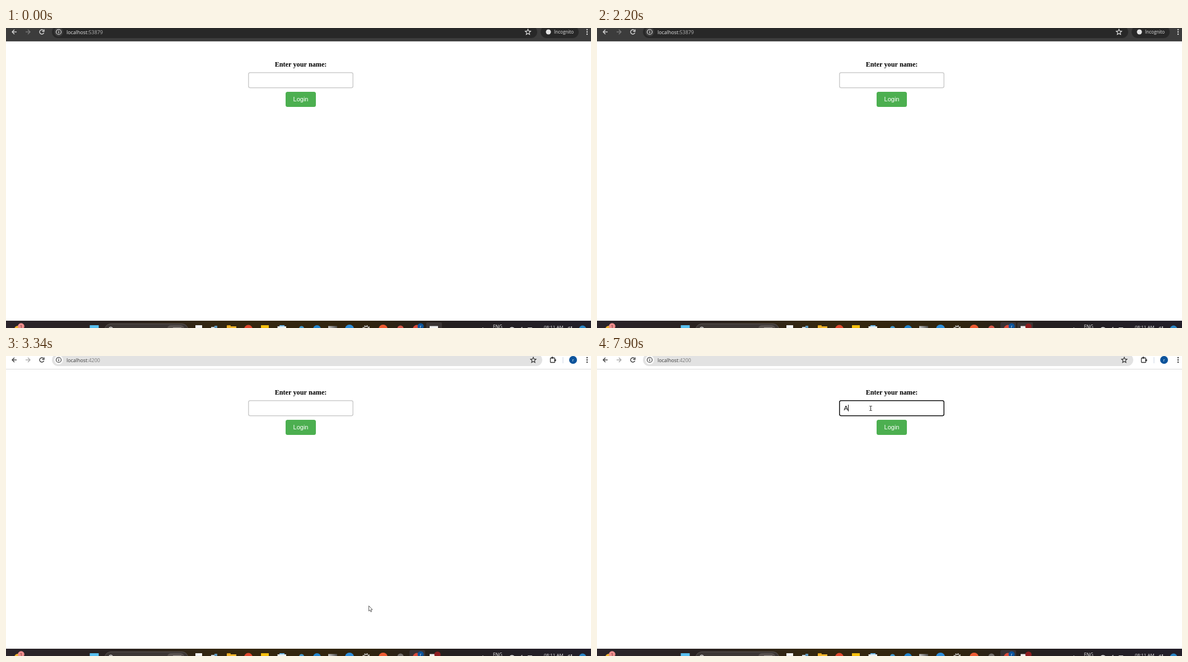
Animation, 1044 px wide and 536 px high, one loop 8000 ms. Source, as an HTML page with a canvas:

```html
<!DOCTYPE html>
<html lang="en">
<head>
<meta charset="utf-8">
<title>Login screen</title>
<style>
html, body { margin: 0; width: 100%; height: 100%; overflow: hidden; background: #fff; }
canvas { display: block; width: 1044px; height: 536px; }
</style>
</head>
<body>
<canvas id="stage" width="1044" height="536"></canvas>
<script>
const ctx = document.getElementById('stage').getContext('2d');
const LOOP = 8000;
const UI = '"Open Sans", "Noto Sans", sans-serif';
const SANS = '"Liberation Sans", Arial, sans-serif';
const SERIF = '"Liberation Serif", Times, serif';
const TITLE = 'TalkNub - Tovena Quorim';
const SWITCH = 3200;

const clamp = v => Math.max(0, Math.min(1, v));
const between = (t, a, b) => t >= a && t < b;

function rect(x, y, w, h, fill) {
  ctx.fillStyle = fill;
  ctx.fillRect(x, y, w, h);
}

function round(x, y, w, h, r, fill, stroke, width = 1) {
  ctx.beginPath();
  ctx.roundRect(x, y, w, h, r);
  if (fill) { ctx.fillStyle = fill; ctx.fill(); }
  if (stroke) { ctx.strokeStyle = stroke; ctx.lineWidth = width; ctx.stroke(); }
}

function disc(x, y, r, fill) {
  ctx.beginPath();
  ctx.arc(x, y, r, 0, Math.PI * 2);
  ctx.fillStyle = fill;
  ctx.fill();
}

function arc(x, y, r, from, to, stroke, width) {
  ctx.beginPath();
  ctx.arc(x, y, r, from, to);
  ctx.strokeStyle = stroke;
  ctx.lineWidth = width;
  ctx.stroke();
}

function line(points, stroke, width = 1) {
  ctx.beginPath();
  points.forEach(([x, y]) => ctx.lineTo(x, y));
  ctx.strokeStyle = stroke;
  ctx.lineWidth = width;
  ctx.stroke();
}

function text(str, x, y, font, fill, align = 'left') {
  ctx.font = font;
  ctx.fillStyle = fill;
  ctx.textAlign = align;
  ctx.fillText(str, x, y);
}

function star(cx, cy, color) {
  ctx.beginPath();
  for (let i = 0; i < 10; i++) {
    const a = -Math.PI / 2 + i * Math.PI / 5, r = i % 2 ? 2.4 : 5.2;
    ctx.lineTo(cx + r * Math.cos(a), cy + r * Math.sin(a));
  }
  ctx.closePath();
  ctx.strokeStyle = color;
  ctx.lineWidth = 1.1;
  ctx.stroke();
}

function navArrow(x, dir, color) {
  line([[x - 4 * dir, 7], [x + 4 * dir, 7]], color, 1.3);
  line([[x, 3], [x + 4 * dir, 7], [x, 11]], color, 1.3);
}

function toolbar(dark) {
  const ink = dark ? '#e3e3e3' : '#303030';
  rect(0, 0, 1044, 23, dark ? '#3c3c3c' : '#fff');
  rect(0, 23, 1044, 1, dark ? '#555' : '#dadada');
  round(82, -4, dark ? 866 : 875, 22, 11, dark ? '#282828' : '#e2e2e2');

  navArrow(15, -1, ink);
  navArrow(39, 1, dark ? '#808080' : '#a0a0a0');
  arc(64, 7, 4, 0.4, 5.5, ink, 1.3);
  line([[68, 2.5], [68, 6], [64.5, 6]], ink, 1.3);

  disc(94, 7, 8, dark ? '#3c3c3c' : '#f8f8f8');
  arc(94, 7, 4.5, 0, 7, ink, 1.1);
  rect(93.4, 6.3, 1.2, 3.2, ink);
  rect(93.4, 4.3, 1.2, 1.2, ink);

  const font = '8.9px ' + UI;
  const host = 'localhost';
  text(host, 108, 10.5, font, dark ? '#e8e8e8' : '#3a3a3a');
  const hostEnd = 108 + ctx.measureText(host).width;
  text(dark ? ':53879' : ':4200', hostEnd, 10.5, font, dark ? '#b8b8b8' : '#777');

  star(dark ? 931.5 : 941, 7.3, ink);
  if (dark) {
    round(954, -4, 68, 22, 11, '#282828');
    disc(968, 7, 4.5, '#e3e3e3');
    text('Incognito', 978, 10, '8.1px ' + UI, '#e3e3e3');
  } else {
    round(971.5, 3.5, 8, 8, 1, null, ink, 1.3);
    disc(975, 3, 1.8, ink);
    disc(980, 7.5, 1.8, ink);
    rect(993.5, 2, 1, 11, '#ccd6e4');
    disc(1012, 7, 7, '#0b539b');
    text('r', 1012, 9.5, '7px ' + UI, '#fff', 'center');
  }
  for (const y of [3, 7, 11]) disc(1037, y, 1.2, ink);
}

function page(t) {
  rect(0, 0, 1044, 536, '#fff');
  text('Enter your name:', 526, 69, 'bold 12.2px ' + SERIF, '#000', 'center');
  const focus = t >= 4220;
  round(432.8, 79.8, 186.4, 26.9, 3, '#fff', focus ? '#101010' : '#ccc', 1.5);
  round(499, 114, 54, 27, 3.5, '#4caf50');
  text('Login', 526, 131, '11px ' + SANS, '#fff', 'center');

  const typed = t >= 7900;
  if (typed) text('A', 440.5, 97, '11.5px ' + SANS, '#000');
  const caretOn = [[4290, 4770], [5320, 5860], [6380, 6840], [7370, LOOP]];
  if (caretOn.some(([a, b]) => between(t, a, b))) rect(typed ? 448 : 440, 87, 1, 12, '#111');
}

function taskbar(t) {
  const bg = ctx.createLinearGradient(0, 0, 1044, 0);
  bg.addColorStop(0, '#2a242b');
  bg.addColorStop(0.2, '#2a221f');
  bg.addColorStop(0.38, '#35270f');
  bg.addColorStop(0.62, '#30240f');
  bg.addColorStop(0.76, '#241f20');
  bg.addColorStop(1, '#231f2a');
  rect(0, 523, 1044, 13, bg);

  // Weather and search
  disc(21, 538, 6, '#f2b632');
  disc(27, 533, 5.8, '#ee8d8d');
  text('1', 27, 536, '7px ' + UI, '#3b1717', 'center');
  rect(149.5, 531, 16, 5, '#58c0f0');
  round(176, 528.5, 149, 22, 11, '#3d3735', '#5b5552');
  arc(187, 538, 3.5, 0, 7, '#ddd', 1.3);
  round(288, 531, 30, 12, 6, '#5a5350');
  rect(298, 535, 15, 1, '#a09a97');

  // Pinned apps
  rect(338, 531, 12, 5, '#f4f4f4');
  rect(366, 534, 6, 2, '#c8d3da');
  rect(372, 532, 5, 4, '#5f9ac0');
  round(394, 531, 7, 4, 1, '#e2a21b');
  rect(394, 533, 17, 3, '#f3b62e');
  disc(432.5, 538, 7.5, '#e2492f');
  rect(455, 531, 14, 5, '#f6bf0c');
  rect(488, 531, 9, 2, '#6bb6e8');
  rect(484.5, 533, 15.5, 3, '#e5eff5');
  disc(527.5, 537, 4.5, '#4398cc');
  disc(555, 538, 7, '#2386cf');
  const grey = ctx.createLinearGradient(575, 0, 591, 0);
  grey.addColorStop(0, '#c8c8c8');
  grey.addColorStop(1, '#4d4d4d');
  rect(575, 532.5, 16, 3.5, grey);
  disc(613, 538, 8, '#2d8fdc');
  ctx.setLineDash([2, 2]);
  arc(643, 538, 6, 0, 7, '#ddd', 2);
  ctx.setLineDash([]);
  arc(643, 538, 4.5, 0, 7, '#ddd', 1.2);
  disc(673, 538, 8, '#ee5b32');
  disc(704, 537, 5.5, t >= SWITCH ? '#75706c' : '#d4574a');

  // Running apps
  const active = t >= SWITCH;
  if (active || between(t, 2130, 2860)) round(720.5, 526, 27, 14, 2, '#393235', '#443c3e', 0.6);
  if (!active) round(750, 526, 28, 14, 2, '#3a3434');
  disc(733.5, 538, 7.5, '#dc4a3b');
  disc(740, 533, 5.5, '#0b539b');
  text('r', 740, 535.5, '6.5px ' + UI, '#fff', 'center');
  rect(756, 532.5, 15, 3.5, '#f0f0f0');
  ctx.globalAlpha = clamp((t - 50) / 190);
  disc(770, 533.5, 5.6, '#8e1d20');
  ctx.globalAlpha = 1;

  // Tray
  line([[848, 538], [851, 535.5], [854, 538]], '#ddd');
  text('ENG', 869, 537, '8.3px ' + UI, '#eee');
  arc(903, 540, 5, 3.9, 5.5, '#eee', 1.5);
  line([[917, 538], [921, 534.5], [921, 538]], '#ddd');
  rect(931, 535, 8, 1, '#ccc');
  text('08:11 AM', 960, 537, '8px ' + UI, '#eee');
  line([[1003, 536], [1004, 534.5], [1007, 534.5]], '#ddd');
  rect(1008.5, 533, 1.5, 3, '#ddd');
  disc(1029, 538, 6.5, '#2b86c8');
}

function panel(x, y, w, h, fill) {
  ctx.save();
  ctx.shadowColor = 'rgba(0,0,0,.2)';
  ctx.shadowBlur = 30;
  ctx.shadowOffsetY = 5;
  round(x, y, w, h, 5, fill);
  ctx.restore();
}

function recorderPreview() {
  panel(691.5, 385, 143.5, 130, '#353535');
  rect(697.5, 394, 10, 7, '#f2f2f2');
  text('ScreenToGif', 713, 401, '7.8px ' + UI, '#eee');
  rect(697, 411, 133, 73, '#fff');
  rect(698, 414, 131, 67.5, '#383838');
  rect(699, 412, 7, 1, '#ccc');
  rect(820, 411.5, 4, 2, '#cc3d42');
  for (const x of [801, 820, 825]) rect(x, 482, 2, 1, '#777');
  for (const x of [727, 745, 781]) round(x, 490, 18, 18, 1, '#303030', '#292929');
  rect(732, 493, 3.8, 11, '#3580bd');
  rect(737.2, 493, 3.8, 11, '#3580bd');
  rect(748.5, 493, 11, 11, '#3580bd');
  cross(790, 498.5, 4.2, '#858585');
}

function cross(x, y, r, color) {
  line([[x - r, y - r], [x + r, y + r]], color);
  line([[x - r, y + r], [x + r, y - r]], color);
}

function thumbnail(x, dark) {
  rect(x, 436, 137, 73, '#fff');
  rect(x, 436, 137, dark ? 8 : 3.5, dark ? '#303030' : '#fbd75e');
  if (dark) {
    rect(x + 3, 437, 22, 2.5, '#474747');
    rect(x + 12, 441, 108, 2, '#242424');
    rect(x + 15, 441.5, 8, 1, '#999');
  } else {
    rect(x + 4, 437, 21, 2.5, '#fff');
    disc(x + 5, 438, 1, '#dc4a3b');
    round(x + 11, 440.5, 112, 3, 1.5, '#e2e2e2');
    rect(x + 15, 441.5, 8, 1, '#888');
  }
  disc(x + 132, 442, 0.9, dark ? '#ccc' : '#0b539b');
  text('Enter your name:', x + 68.5, 450.5, 'bold 1.7px ' + SERIF, '#000', 'center');
  round(x + 65, 456, 7, 3.5, 0.5, '#4caf50');
}

function browserPreview(hover) {
  panel(585, 410, 296, 105, '#3d3d3d');
  if (hover) round(585, 410, 148, 105, [5, 0, 0, 5], '#414141');
  disc(596.5, 423, 5.5, '#dc4a3b');
  disc(744.5, 423, 5.5, '#dc4a3b');
  const font = '8px ' + UI;
  text(hover ? TITLE.slice(0, -3) + '...' : TITLE, 607, 426, font, '#f0f0f0');
  text(TITLE, 755, 426, font, '#f0f0f0');
  if (hover) cross(719.5, 423, 3, '#eee');
  thumbnail(591, false);
  thumbnail(739, true);
}

// Pointer routes as [time, x, y]
const routes = [
  [[380, 983, 525], [600, 764, 490], [800, 764, 490], [1400, 761, 537]],
  [[2790, 730, 537], [2990, 648, 446], [3370, 647, 446], [3540, 503, 177],
   [3750, 492, 108], [3950, 488, 93], [LOOP, 488, 93]]
];

function pointerAt(t) {
  for (const path of routes) {
    const i = path.findIndex(([time]) => t < time);
    if (i < 1) continue;
    const [t0, x0, y0] = path[i - 1], [t1, x1, y1] = path[i];
    const k = (t - t0) / (t1 - t0);
    return [x0 + (x1 - x0) * k, y0 + (y1 - y0) * k];
  }
}

function pointer(t) {
  const at = pointerAt(t);
  if (!at) return;
  const [x, y] = at;
  if (between(t, 3050, 3130) || between(t, 4220, 4440)) disc(x, y + 0.5, 8.3, 'rgba(255,242,50,.75)');
  if (t > SWITCH && y < 108) {
    rect(x, y - 4, 1, 9, '#222');
    for (const dy of [-4, 4]) rect(x - 2, y + dy, 5, 1, '#555');
    return;
  }
  ctx.beginPath();
  for (const [dx, dy] of [[0, 0], [0, 9.3], [2.1, 7.5], [3.6, 10.8], [5.1, 10.1], [3.7, 6.9], [6.5, 6.7]])
    ctx.lineTo(x + dx + 0.4, y + dy + 0.4);
  ctx.closePath();
  ctx.fillStyle = '#fff';
  ctx.fill();
  ctx.strokeStyle = '#333';
  ctx.lineWidth = 0.8;
  ctx.stroke();
}

function draw(now) {
  const t = now % LOOP;
  page(t);
  toolbar(t < SWITCH);
  if (between(t, 1670, 2010)) recorderPreview();
  if (between(t, 2790, SWITCH)) browserPreview(t >= 2900);
  taskbar(t);
  pointer(t);
}

const start = performance.now();
function tick() {
  draw(performance.now() - start);
  requestAnimationFrame(tick);
}
tick();
</script>
</body>
</html>
```
